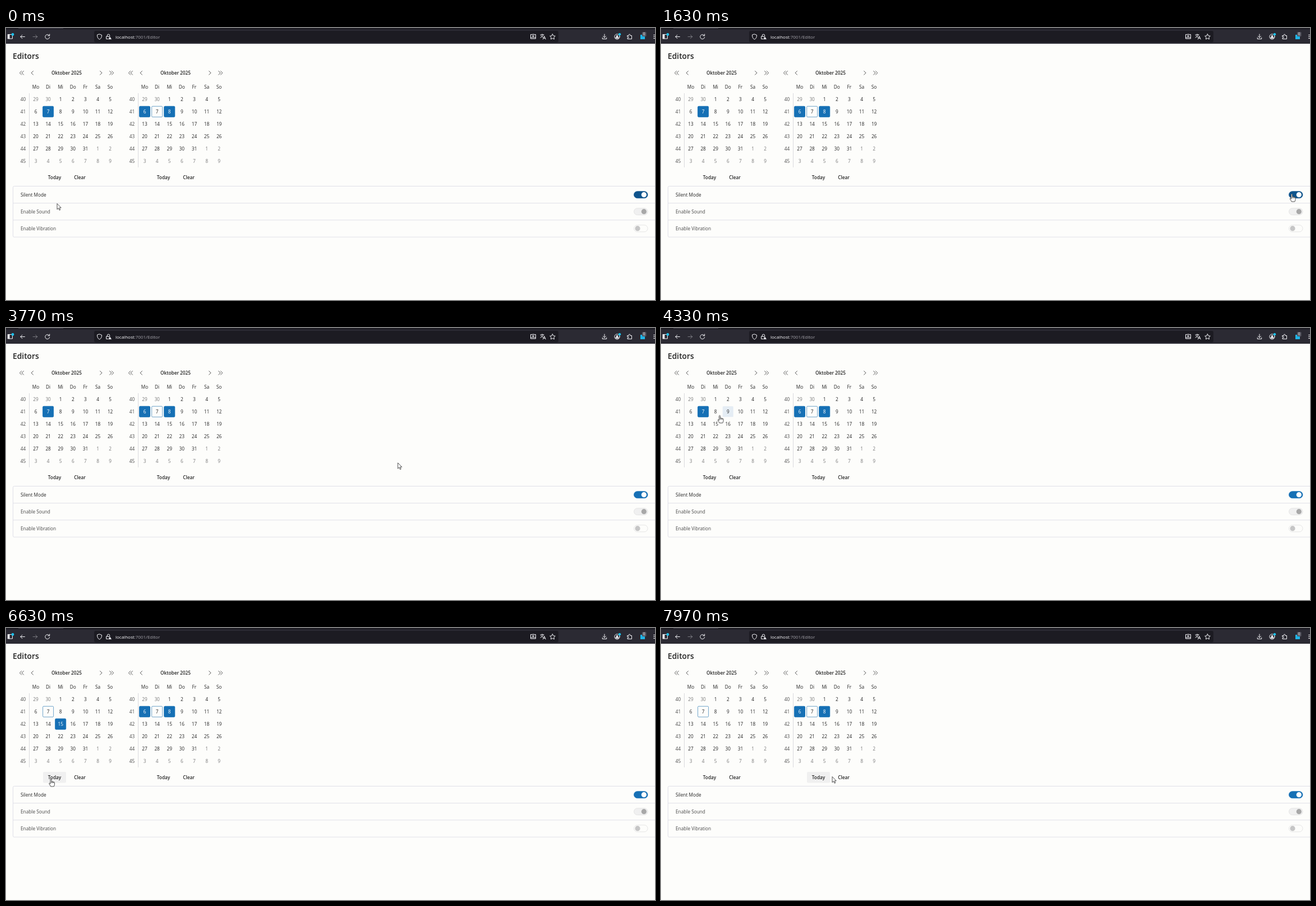
An HTML page that plays this animation: 1156 px wide and 484 px high, repeating every 8000 ms.

```html
<!DOCTYPE html>
<html lang="de">
<head>
<meta charset="utf-8">
<title>Editors</title>
<style>
  html, body { margin: 0; width: 100%; height: 100%; overflow: hidden; background: #fdfdfb; }
  svg { display: block; width: 1156px; height: 484px; }
  text { font: 8.25px "Open Sans", "Noto Sans", sans-serif; fill: #242424; }
  .mid { text-anchor: middle; }
  .bold { font-weight: 600; }
  .url { font-size: 8px; fill: #a5a4ab; }
  .ico { fill: none; stroke: #f4f4f8; stroke-width: 1; stroke-linecap: round; stroke-linejoin: round; }
  .nav { fill: none; stroke: #424242; stroke-width: .9; }
</style>
</head>
<body>
<svg id="stage" viewBox="0 0 1156 484"></svg>
<script>
const LOOP = 8000;
const BLUE = '#1670b5', DARK = '#0f548c', LINE = '#e0e0e8';
const stage = document.getElementById('stage');

function add(tag, attrs, parent = stage) {
  const el = document.createElementNS('http://www.w3.org/2000/svg', tag);
  set(el, attrs);
  parent.append(el);
  return el;
}
function set(el, attrs) {
  for (const k in attrs) el.setAttribute(k, attrs[k]);
}
function rect(x, y, width, height, fill, rx = 0, more = {}) {
  return add('rect', { x, y, width, height, fill, rx, ...more });
}
function circle(cx, cy, r, fill) {
  return add('circle', { cx, cy, r, fill });
}
function path(d, cls = 'ico', more = {}) {
  return add('path', { d, class: cls, ...more });
}
function label(str, x, y, cls = '', style = '') {
  const el = add('text', { x, y, class: cls, style });
  el.textContent = str;
  return el;
}

function drawToolbar() {
  rect(0, 0, 1156, 28, '#2b2a33');
  rect(0, 0, 1156, 2.5, '#1c1b22');
  rect(22, 0, 80, 1, '#42414d');
  rect(157, 5, 827, 20.5, '#1c1b22', 3);

  path('M3.5 11.5h8v7.500h-8z M6 11.5v7.500');
  rect(3.5, 11.5, 2.5, 7.5, '#f4f4f8');
  circle(12, 11.5, 2.4, '#1fc3ee');
  path('M33.500 15.500H26 M29 12.300L25.800 15.500L29 18.700');
  path('M48 15.500H55.500 M52.500 12.300L55.700 15.500L52.500 18.700', 'ico', { opacity: .38 });
  path('M77 13.300A4 4 0 1 0 77.700 16.500 M77.700 11v2.800h-2.800');

  path('M166.500 11l4 1.500c0 4-1 6.200-4 7.800c-3-1.600-4-3.800-4-7.800z');
  path('M180.300 15v-1.700a2.200 2.200 0 0 1 4.400 0V15 M179 15h5v4.500h-5z');
  path('M185.300 15.300l3 5h-6z', 'ico', { style: 'fill:#f4f4f8;stroke:#1c1b22;stroke-width:.5' });
  const url = label('', 195, 18.9, 'url');
  const host = add('tspan', { fill: '#f8f8fb' }, url);
  host.textContent = 'localhost';
  url.append(':7001/Editor');

  path('M937.500 11.500h-3v7.500h9v-7.500h-3 M939 10.500v5 M937 13.700l2 2l2-2 M934.500 17h9');
  path('M952 12h6 M955 10.800v1.200 M957 12c-.8 2.500-2.500 4-5 5 M953 13.500c.8 1.700 2 2.500 3.500 3 M956.500 20l2.300-5.500l2.300 5.500 M957.300 18.200h3');
  path('M973.500 10.800l1.500 3l3.300.5l-2.400 2.300l.6 3.300l-3-1.500l-3 1.500l.6-3.300l-2.400-2.300l3.300-.5z');

  path('M1066 11v6 M1063.500 14.700l2.500 2.500l2.500-2.500 M1062.300 17.200v2.300h7.400v-2.300');
  circle(1088.5, 15.5, 4.6, 'none').setAttribute('class', 'ico');
  circle(1088.5, 14.3, 1.6, '#f4f4f8');
  path('M1085.700 17.800a2.800 2 0 0 1 5.600 0z', 'ico', { style: 'fill:#f4f4f8' });
  circle(1093, 11.3, 2.3, '#1fc3ee');
  path('M1107 13.500h2.300v-1a1.300 1.300 0 0 1 2.600 0v1h2.600v6h-7.500v-2h1a1.100 1.100 0 0 0 0-2.200h-1z');
  rect(1130, 12, 8, 8, '#1fb4e6');
  rect(1133, 7, 7.5, 8, '#55545f', 1.5);
  label('0', 1136.7, 13.3, 'mid', 'font-size:6.5px;fill:#fff');
  path('M1153.500 12.500h5 M1153.500 15.500h5 M1153.500 18.500h5');
}

const cells = [], buttons = [];
const DAYS = ['Mo', 'Di', 'Mi', 'Do', 'Fr', 'Sa', 'So'];

function chevron(x, dir) {
  path(`M${x - 1.7 * dir} 76.300l${3.6 * dir} 3.600l${-3.6 * dir} 3.600`, 'nav');
}

function drawCalendar(side) {
  const ox = side * 194;
  [[26.3, -1], [30, -1], [47, -1], [169, 1], [186, 1], [189.7, 1]].forEach(([x, d]) => chevron(x + ox, d));
  label('Oktober 2025', 108 + ox, 82.9, 'mid bold');
  rect(41 + ox, 116, 1, 132, '#d9d9dd');
  DAYS.forEach((d, i) => label(d, 53 + ox + i * 22.1, 107.5, 'mid'));
  for (let r = 0; r < 6; r++) {
    const cy = 126.5 + r * 22.1;
    label(40 + r, 30.5 + ox, cy + 3, 'mid', 'fill:#4a4a4a');
    for (let c = 0; c < 7; c++) {
      const n = r * 7 + c - 1;
      const inside = n >= 1 && n <= 31;
      const day = n < 1 ? n + 30 : inside ? n : n - 31;
      const cx = 53 + ox + c * 22.1;
      const box = rect(cx - 9.5, cy - 9.3, 19, 19, 'none', 1.5);
      const text = label(day, cx, cy + 3, 'mid');
      cells.push({ side, n, cx, cy, box, text, ink: inside ? '#242424' : '#7b7b7b' });
    }
  }
  [['Today', 86.5, 41], ['Clear', 131.5, 37]].forEach(([str, x, w]) => {
    const cx = x + ox;
    buttons.push({ cx, w, box: rect(cx - w / 2, 256, w, 19.5, 'none', 2) });
    label(str, cx, 268.5, 'mid bold');
  });
}

function drawToggle(cy) {
  return {
    track: rect(1118.5, cy - 6, 24.5, 12, '#fff', 6, { 'stroke-width': .8 }),
    knob: circle(1136.3, cy, 4.6, '#fff')
  };
}

drawToolbar();
label('Editors', 12, 55, 'bold', 'font-size:13.8px');
drawCalendar(0);
drawCalendar(1);
path('M1156 281.500H14.500a2 2 0 0 0-2 2V370a2 2 0 0 0 2 2H1156 M12.500 311.700H1156 M12.500 341.800H1156', '',
  { fill: 'none', stroke: LINE });
const rows = ['Silent Mode', 'Enable Sound', 'Enable Vibration'].map((str, i) => {
  const cy = 296.7 + i * 30;
  return { text: label(str, 26, cy + 3, ''), ...drawToggle(cy) };
});

const arrow = path('M0 0V10.300L2.400 8L4 11.700L5.700 11L4.100 7.400H7.200Z', '',
  { fill: '#fff', stroke: '#222', 'stroke-width': .8 });
const hand = path('M-1 1.200Q0-.5 1 1.200V5.300Q2 4.500 2.900 5.600Q4 5 4.700 6.100Q6.300 5.600 6.500 7.400V10.500Q6.300 12 5.300 14H-.3Q-1.300 11.800-3 9.700Q-3.700 8.200-2.500 8L-1 9.400Z M1 5.300V8 M2.900 5.600V8 M4.700 6.100V8', '',
  { fill: '#fff', stroke: '#222', 'stroke-width': .8 });

// Pointer path: time, x, y
const PATH = [
  [0, 91, 312.5], [80, 91, 312.5], [450, 480, 426], [840, 900, 357], [1300, 1121, 297],
  [1630, 1123.5, 295], [1900, 1125, 296], [3000, 1125, 296], [3450, 1125, 296],
  [4150, 150, 168], [4330, 104.5, 155], [4550, 97, 152], [4950, 131, 265], [5250, 131, 266],
  [5750, 97, 174], [6150, 97, 174], [6520, 80, 268], [6900, 80, 268], [7300, 131, 267],
  [7600, 131, 267], [7860, 285, 265], [7970, 305, 264.5], [8000, 309, 264.5]
];
// Hard changes: silent mode off/on, then the chosen day on the left
const OFF = 1800, ON = 2930;
const PICKS = [[0, 7], [5050, null], [6050, 15], [6750, 7], [7550, null]];

const clamp = v => Math.max(0, Math.min(1, v));
const ease = v => v * v * (3 - 2 * v);

function pointer(t) {
  const i = Math.max(1, PATH.findIndex(p => p[0] > t));
  const [t0, x0, y0] = PATH[i - 1], [t1, x1, y1] = PATH[i];
  const k = ease(clamp((t - t0) / (t1 - t0)));
  return { x: x0 + (x1 - x0) * k, y: y0 + (y1 - y0) * k };
}
const inBox = (p, cx, cy, w, h) => Math.abs(p.x - cx) <= w / 2 && Math.abs(p.y - cy) <= h / 2;
const onCell = (p, c) => inBox(p, c.cx, c.cy, 20, 20);
const onButton = (p, b) => inBox(p, b.cx, 265.7, b.w, 19.5);

function paintToggle(row, on, level, hover, enabled) {
  const edge = hover ? '#575757' : '#666';
  const fill = hover ? DARK : BLUE;
  set(row.knob, { cx: 1125 + 11.3 * level });
  if (!enabled) {
    set(row.track, { fill: on ? '#f0f0f0' : '#fdfdfb', stroke: '#e0e0e0' });
    set(row.knob, { fill: on ? '#a8a8a8' : '#c6c6c6' });
  } else {
    set(row.track, { fill: on ? fill : '#fdfdfb', stroke: on ? fill : edge });
    set(row.knob, { fill: on ? '#fff' : edge });
  }
}

function draw(t) {
  const p = pointer(t), late = pointer(Math.max(0, t - 60));
  const picked = PICKS.filter(s => s[0] <= t).pop()[1];

  for (const c of cells) {
    const chosen = c.side ? c.n === 6 || c.n === 8 : c.n === picked;
    const fill = chosen ? BLUE : onCell(late, c) ? '#e5edf4' : 'none';
    const ring = chosen || c.n === 7;
    set(c.box, { fill, stroke: ring ? (chosen ? BLUE : '#5f9ac6') : 'none', 'stroke-width': .9 });
    c.text.style.fill = chosen ? '#fff' : c.ink;
  }
  for (const b of buttons) set(b.box, { fill: onButton(late, b) ? '#f0f0f0' : 'none' });

  const silent = t < OFF || t >= ON;
  const level = t < ON ? 1 - ease(clamp((t - OFF) / 150)) : ease(clamp((t - ON) / 150));
  const over = i => late.y >= 282 + i * 30 && late.y < 313 + i * 30;
  paintToggle(rows[0], silent, level, over(0), true);
  paintToggle(rows[1], true, 1, over(1), !silent);
  paintToggle(rows[2], false, 0, over(2), !silent);
  rows[1].text.style.fill = rows[2].text.style.fill = silent ? '#484848' : '#242424';

  const link = inBox(p, 1130.7, 297, 25, 13) || cells.some(c => onCell(p, c)) || buttons.some(b => onButton(p, b));
  const move = `translate(${p.x.toFixed(2)} ${p.y.toFixed(2)})`;
  set(hand, { transform: move, visibility: link ? 'visible' : 'hidden' });
  set(arrow, { transform: move, visibility: link ? 'hidden' : 'visible' });
}

const start = performance.now();
function tick(now) {
  draw(Math.max(0, now - start) % LOOP);
  requestAnimationFrame(tick);
}
draw(0);
requestAnimationFrame(tick);
</script>
</body>
</html>
```
